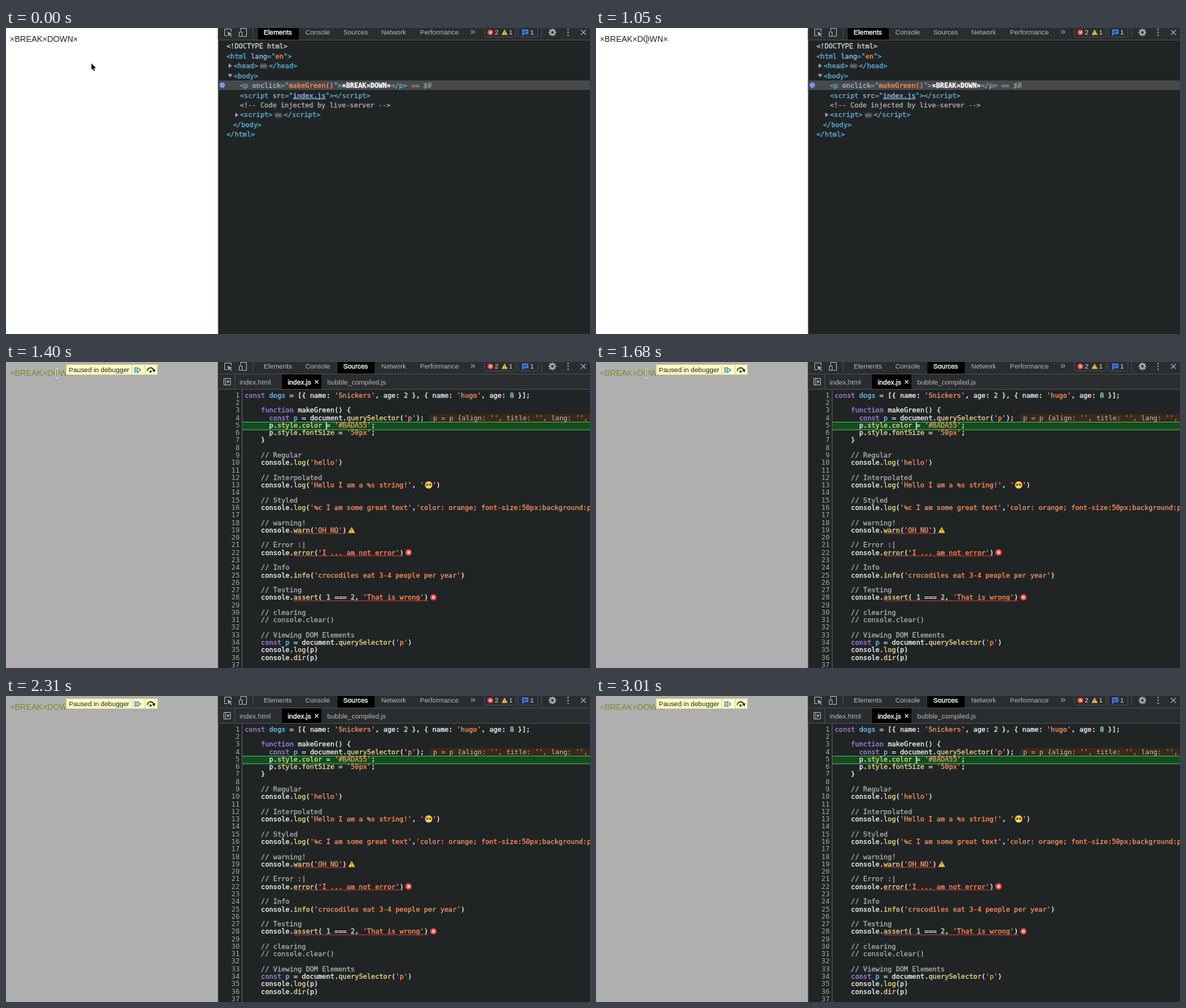
These frames come from a looping animation (800x420 px, 3.08 s). An HTML page with a canvas:

```html
<!DOCTYPE html>
<html lang="en">
<head>
<meta charset="utf-8">
<title>Paused in debugger</title>
<style>
  html, body { margin: 0; width: 100%; height: 100%; overflow: hidden; background: #202425; }
  canvas { display: block; }
</style>
</head>
<body>
<canvas id="stage" width="800" height="420"></canvas>
<script>
const ctx = document.getElementById('stage').getContext('2d');
const LOOP = 3080, STEP = 70;
const PAUSED_AT = 1120, SOURCES_AT = 1260, POINTER_GONE_AT = 1890;
const SIZE = 9.28, COLUMN = SIZE * 0.602;
const MONO = `${SIZE}px "DejaVu Sans Mono", monospace`;
const SANS = `${SIZE}px "Liberation Sans", sans-serif`;
const LEFT = 290.5;
const C = {
  panel: '#202425', bar: '#2a2d30', line: '#484b4e', icon: '#a4a8ac', light: '#d5d8da',
  tag: '#5db0d7', attr: '#9bbbdc', string: '#fa8d5a', comment: '#aaaeae', white: '#f4f4f4',
  keyword: '#a184dc', number: '#a1f7b5', property: '#e6d689', definition: '#78bdec',
  red: '#ee4b46', yellow: '#f5c33b', blue: '#3b82f0'
};

function rect(x, y, w, h, color) {
  ctx.fillStyle = color;
  ctx.fillRect(x, y, w, h);
}

function path(points, { fill, stroke, width = 1, close = !!fill }) {
  ctx.beginPath();
  points.forEach(([x, y]) => ctx.lineTo(x, y));
  if (close) ctx.closePath();
  if (stroke) { ctx.strokeStyle = stroke; ctx.lineWidth = width; ctx.stroke(); }
  if (fill) { ctx.fillStyle = fill; ctx.fill(); }
}

function disc(x, y, r, color) {
  ctx.beginPath();
  ctx.arc(x, y, r, 0, Math.PI * 2);
  ctx.fillStyle = color;
  ctx.fill();
}

function outline(x, y, w, h, color, r = 0) {
  ctx.beginPath();
  ctx.roundRect(x, y, w, h, r);
  ctx.strokeStyle = color;
  ctx.lineWidth = 1;
  ctx.stroke();
}

function text(str, x, y, color, font = MONO, align = 'left', weight = 0) {
  ctx.font = font;
  ctx.fillStyle = ctx.strokeStyle = color;
  ctx.textAlign = align;
  ctx.fillText(str, x, y + 3.3);
  if (weight) {
    ctx.lineWidth = weight;
    ctx.strokeText(str, x, y + 3.3);
  }
}

// Draws [text, color, style] runs on one monospaced line, slightly emboldened.
function runs(x, y, list) {
  for (const [str, color, style = ''] of list) {
    text(str, x, y, color, `${style} ${MONO}`, 'left', 0.3);
    x += str.length * COLUMN;
  }
}

function cross(x, y, r, color, width = 1) {
  path([[x - r, y - r], [x + r, y + r]], { stroke: color, width });
  path([[x + r, y - r], [x - r, y + r]], { stroke: color, width });
}

function errorIcon(x, y, r = 4.3) {
  disc(x, y, r, C.red);
  cross(x, y, r * 0.38, '#fff', 1.1);
}

function warningIcon(x, y, r = 4.3) {
  path([[x, y - r], [x + r + 0.4, y + r], [x - r - 0.4, y + r]], { fill: C.yellow });
  rect(x - 0.5, y - r * 0.35, 1, r * 0.7, '#8a6a14');
  rect(x - 0.5, y + r * 0.6, 1, 1, '#8a6a14');
}

function twisty(x, y, open) {
  path(open ? [[x - 3, y - 2], [x + 3, y - 2], [x, y + 2.5]]
            : [[x - 2, y - 3], [x + 2.5, y], [x - 2, y + 3]], { fill: C.icon });
}

function badge(x, y) {
  ctx.beginPath();
  ctx.roundRect(x, y - 3, 10.5, 7, 2.5);
  ctx.fillStyle = '#4b4f52';
  ctx.fill();
  for (let i = 0; i < 3; i++) rect(x + 2.3 + i * 2.2, y, 1.2, 1.2, '#b4b8ba');
}

function drawToolbar(active) {
  rect(LEFT, 0, 800 - LEFT, 16, C.bar);
  rect(LEFT, 16, 800 - LEFT, 1, C.line);

  path([[303, 10.5], [299.5, 10.5], [299.5, 1.5], [308.5, 1.5], [308.5, 5]], { stroke: C.icon });
  path([[303.5, 5], [310, 8], [307.3, 8.8], [309.5, 11.4], [308.4, 12.2], [306.3, 9.6], [304.5, 11.5]], { fill: C.icon });
  outline(321.5, 0.5, 8, 11, C.icon);
  rect(318.5, 4.5, 6, 7.5, C.bar);
  outline(319.5, 5.5, 4, 6, C.icon);
  rect(338, 0, 1, 13, C.line);

  const tabs = { Elements: 353, Console: 410, Sources: 462, Network: 514, Performance: 567 };
  if (active === 'Elements') rect(345, 0, 56, 16, '#000');
  else rect(454, 0, 51, 16, '#000');
  for (const [name, x] of Object.entries(tabs)) {
    const on = name === active;
    text(name, x, 6, on ? '#fff' : '#b4b8bb', SANS, 'left', on ? 0.3 : 0);
  }
  text('»', 636, 5.5, C.icon, '13px "Liberation Sans", sans-serif');

  outline(655.5, -1.5, 43, 14, C.line, 2);
  errorIcon(663.5, 6, 3.8);
  text('2', 669.5, 6, C.light, SANS);
  warningIcon(683, 5.7, 3.7);
  text('1', 689, 6, C.light, SANS);
  outline(701.5, -1.5, 27, 14, C.line, 2);
  path([[707, 2], [715.5, 2], [715.5, 8.5], [710, 8.5], [707, 11]], { fill: C.blue });
  rect(708.5, 4, 5.5, 1, C.bar);
  rect(708.5, 6, 4, 1, C.bar);
  text('1', 718, 6, C.light, SANS);
  rect(733, 0, 1, 13, C.line);

  for (let i = 0; i < 8; i++) {
    const a = i * Math.PI / 4;
    path([[748.5 + 2.5 * Math.cos(a), 6 + 2.5 * Math.sin(a)],
          [748.5 + 5.2 * Math.cos(a), 6 + 5.2 * Math.sin(a)]], { stroke: C.icon, width: 2 });
  }
  disc(748.5, 6, 4, C.icon);
  disc(748.5, 6, 1.8, C.bar);
  for (const y of [2, 6, 10]) disc(770, y, 1.1, C.icon);
  cross(791, 6, 3.4, C.icon, 1.2);
}

function drawElements() {
  const row = n => 24.8 + n * 13.48;
  rect(LEFT, 72, 510, 13, '#47494a');
  disc(296.3, 78.3, 3.6, '#7c93f5');
  const tag = s => [s, C.tag];

  runs(302, row(0), [['<!DOCTYPE html>', '#cfcfcf']]);
  runs(302, row(1), [tag('<html '), ['lang', C.attr], tag('="'), ['en', C.string], tag('">')]);
  twisty(307, row(2), false);
  runs(312, row(2), [tag('<head>')]);
  badge(347.5, row(2));
  runs(360, row(2), [tag('</head>')]);
  twisty(307, row(3), true);
  runs(312, row(3), [tag('<body>')]);
  runs(320.5, row(4), [tag('<p '), ['onclick', C.attr], tag('="'), ['makeGreen()', C.string], tag('">'),
    ['×BREAK×DOWN×', '#fff', 'bold'], tag('</p>'), [' == ', '#a0a4a6'], ['$0', '#a0a4a6', 'italic']]);
  runs(320.5, row(5), [tag('<script '), ['src', C.attr], tag('="'), ['index.js', '#9db9f5'], tag('"><\/script>')]);
  rect(393, row(5) + 4.5, 45, 1, '#9db9f5');
  runs(320.5, row(6), [['<!-- Code injected by live-server -->', C.comment]]);
  twisty(316, row(7), false);
  runs(320.5, row(7), [tag('<script>')]);
  badge(368, row(7));
  runs(380.5, row(7), [tag('<\/script>')]);
  runs(311, row(8), [tag('</body>')]);
  runs(302, row(9), [tag('</html>')]);
}

const source = `const dogs = [{ name: 'Snickers', age: 2 }, { name: 'hugo', age: 8 }];

    function makeGreen() {
      const p = document.querySelector('p');
      p.style.color = '#BADA55';
      p.style.fontSize = '50px';
    }

    // Regular
    console.log('hello')

    // Interpolated
    console.log('Hello I am a %s string!', '  ')

    // Styled
    console.log('%c I am some great text','color: orange; font-size:50px;background:pink')

    // warning!
    console.warn('OH NO')

    // Error :|
    console.error('I ... am not error')

    // Info
    console.info('crocodiles eat 3-4 people per year')

    // Testing
    console.assert( 1 === 2, 'That is wrong')

    // clearing
    // console.clear()

    // Viewing DOM Elements
    const p = document.querySelector('p')
    console.log(p)
    console.dir(p)
`.split('\n');

const TOKEN = /(\/\/.*)|('[^']*')|\b(const|function)\b|\b(\d+)\b|((?<=\.)\w+)|((?<=const )\w+)|\w+|[^\w'\/]/g;
const TOKEN_COLORS = [C.comment, C.string, C.keyword, C.number, C.property, C.definition];

function highlight(line) {
  return [...line.matchAll(TOKEN)].map(m => {
    const kind = m.slice(1).findIndex(Boolean);
    return [m[0], TOKEN_COLORS[kind] || C.white];
  });
}

const codeX = column => 327 + column * COLUMN;
const codeY = line => 45.5 + (line - 1) * 10.28;

function squiggle(line, from, to) {
  const points = [];
  for (let x = codeX(from); x <= codeX(to); x++) {
    points.push([x, codeY(line) + 4.7 + 0.5 * Math.sin(x * 1.6)]);
  }
  path(points, { stroke: '#d2352c' });
}

function face(x, y) {
  disc(x, y, 5, '#f7c64a');
  disc(x - 2, y - 0.3, 1.3, '#4a3214');
  disc(x + 2, y - 0.3, 1.3, '#4a3214');
  rect(x - 2, y + 2, 4, 1, '#fff1c8');
}

function drawFileTabs() {
  rect(LEFT, 17, 510, 20, C.bar);
  rect(LEFT, 37, 510, 1, C.line);
  rect(378, 17, 54, 20, '#000');
  outline(298.5, 22.5, 9, 9, C.icon);
  rect(300.5, 23, 1, 8, C.icon);
  path([[303, 24.5], [306.5, 27], [303, 29.5]], { fill: C.icon });
  rect(313, 17, 1, 20, C.line);
  const font = SANS.replace(SIZE, 9.42);
  text('index.html', 320, 27.3, '#b4b8bb', font);
  text('index.js', 386, 27.3, '#fff', font, 'left', 0.3);
  cross(425.5, 27.3, 2.3, C.light, 1.2);
  text('bubble_compiled.js', 440, 27.3, '#b4b8bb', font);
}

function drawSources(caret) {
  drawFileTabs();
  rect(323, 38, 1, 382, '#56595b');
  rect(580, 71.5, 220, 10.5, '#3c2917');
  rect(324, 82, 476, 11.5, '#114d1d');
  rect(324, 82, 476, 1, '#4fa35c');
  rect(324, 92.5, 476, 1, '#4fa35c');

  source.forEach((line, i) => {
    text(i + 1, 320, codeY(i + 1), '#a6aaac', MONO, 'right');
    runs(codeX(0), codeY(i + 1), highlight(line));
  });
  text("p = p {align: '', title: '', lang: '', translate", 585, codeY(4), '#c4bfb8');

  face(579, codeY(13));
  squiggle(19, 12, 25);
  squiggle(22, 12, 39);
  squiggle(28, 12, 45);
  warningIcon(473.5, codeY(19));
  errorIcon(551.5, codeY(22));
  errorIcon(585.5, codeY(28));
  if (caret) rect(438.3, 82.5, 1.2, 10.5, '#fff');
}

function drawPage(paused) {
  rect(0, 0, LEFT + 1, 420, paused ? '#afafaf' : '#fff');
  text('×BREAK×DOWN×', 5.2, 16, paused ? '#788c30' : '#222', '11.25px "Liberation Sans", sans-serif');
  if (!paused) return;

  rect(82, 3, 126, 15, '#ffffc4');
  outline(82.5, 3.5, 125, 14, '#c9c99b');
  text('Paused in debugger', 86, 11, '#222', SANS);
  rect(172, 4, 1, 13, '#d0d0a2');
  rect(190, 4, 1, 13, '#d0d0a2');
  rect(176, 7, 1.6, 8, '#3e87c6');
  path([[179.5, 7.5], [184.5, 11], [179.5, 14.5]], { stroke: '#3e87c6', width: 1.3, close: true });
  ctx.beginPath();
  ctx.arc(198, 12.5, 4.5, Math.PI, -0.25);
  ctx.strokeStyle = '#222';
  ctx.lineWidth = 1.5;
  ctx.stroke();
  path([[204.5, 9.5], [203.8, 14], [200, 11.8]], { fill: '#222' });
  disc(198, 13, 1.6, '#222');
}

function drawArrow(x, y) {
  const shape = [[0, 0], [0, 9], [2, 7.2], [3.4, 10.4], [5, 9.7], [3.6, 6.6], [6.2, 6.4]];
  path(shape.map(([dx, dy]) => [x + dx, y + dy]), { fill: '#111', stroke: '#fff', width: 1.4 });
}

function drawIBeam(x, y) {
  for (const [color, width] of [['#fff', 2.4], ['#444', 0.9]]) {
    path([[x, y - 4.5], [x, y + 4.5]], { stroke: color, width });
    for (const side of [-1, 1]) {
      path([[x - 2, y + side * 5.5], [x, y + side * 4.3], [x + 2, y + side * 5.5]], { stroke: color, width });
    }
  }
}

function drawPointer(t) {
  const p = Math.min(1, Math.max(0, (t - 70) / 700));
  const ease = p * p * (3 - 2 * p);
  const x = 117 - 47.5 * ease, y = 48.5 - 33 * ease;
  if (x < 98 && y < 23) drawIBeam(x, y);
  else drawArrow(x, y);
}

function draw(t) {
  const caretOn = (t >= SOURCES_AT && t < 1890) || t >= 2450;
  drawPage(t >= PAUSED_AT);
  rect(LEFT, 0, 510, 420, C.panel);
  if (t < SOURCES_AT) {
    drawToolbar('Elements');
    drawElements();
  } else {
    drawToolbar('Sources');
    drawSources(caretOn);
  }
  if (t < POINTER_GONE_AT) drawPointer(t);
}

ctx.lineJoin = 'round';
const start = performance.now();
function frame() {
  const t = (performance.now() - start) % LOOP;
  draw(Math.floor(t / STEP) * STEP);
  requestAnimationFrame(frame);
}
frame();
</script>
</body>
</html>
```
